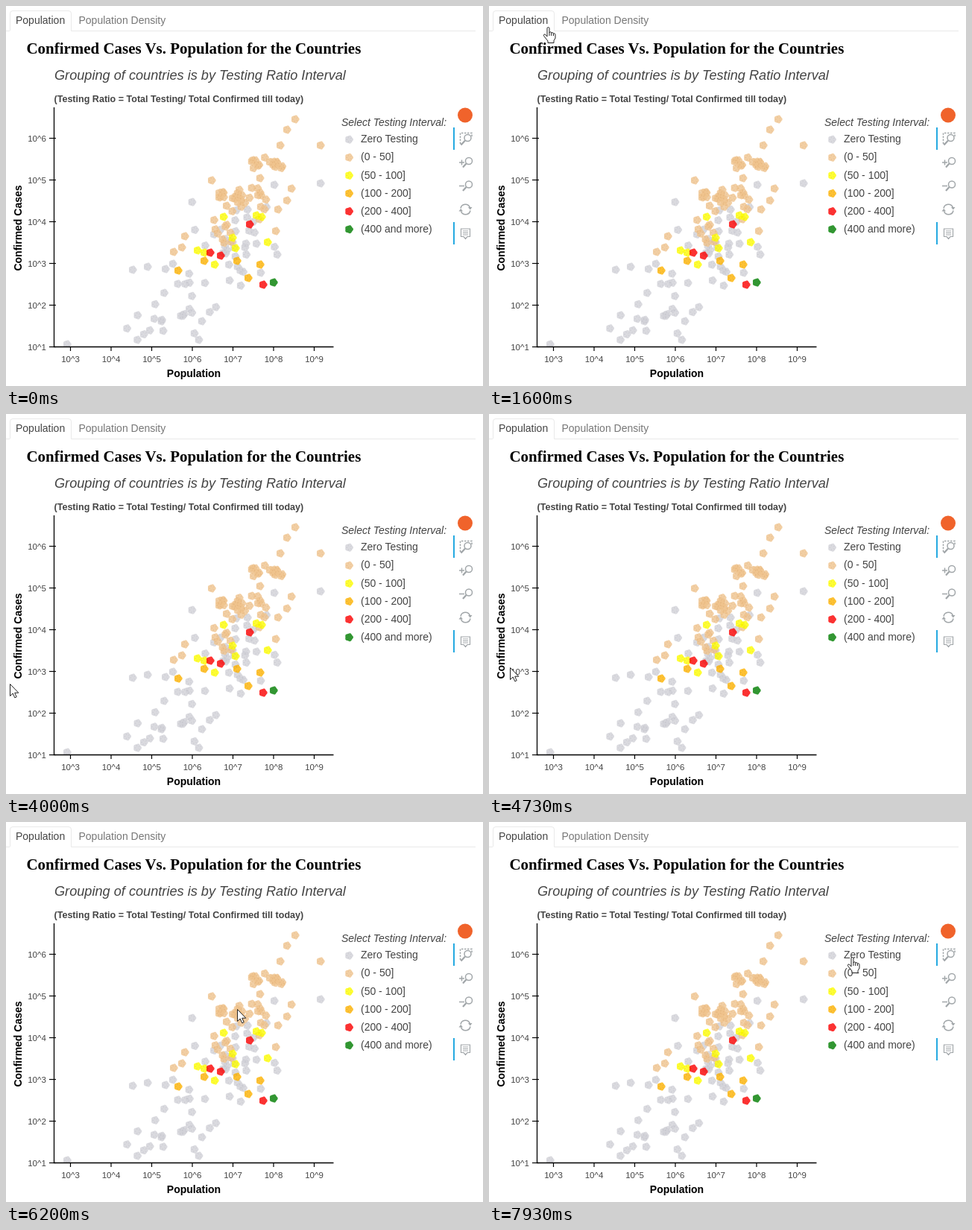
Write an HTML page that moves like this. It is 640 px wide and 510 px high and loops after 8000 ms.

```html
<!DOCTYPE html>
<html lang="en">
<head>
<meta charset="utf-8">
<title>Confirmed cases and population</title>
<style>
  html, body { margin: 0; width: 100%; height: 100%; overflow: hidden; background: #fff; }
  svg { display: block; width: 640px; height: 510px; }
  text { font: 14px "Liberation Sans", Arial, sans-serif; fill: #444; }
  .heading { font: bold 20.95px "Liberation Serif", Times, serif; fill: #000; }
  .subtitle { font-size: 18.16px; font-style: italic; }
  .legend-title { font-style: italic; }
  .note { font-size: 12.55px; font-weight: bold; }
  .axis-name { font-weight: bold; fill: #000; text-anchor: middle; }
  .tick { font-size: 11.5px; }
  .icon { fill: none; stroke: #a1a6a9; stroke-width: 1.5; }
  .cursor { fill: #fff; stroke: #222; stroke-linejoin: round; }
</style>
</head>
<body>
<svg viewBox="0 0 640 510">
  <defs>
    <clipPath id="plot"><rect x="65" y="136" width="375" height="322"/></clipPath>
  </defs>

  <path d="M5.5 33V10Q5.5 6.500 9 6.500H84Q87.500 6.500 87.500 10V33.500H630M5 33.500H0" fill="none" stroke="#e9e9e9"/>
  <text x="13" y="24">Population</text>
  <text x="97.500" y="24" style="fill:#777">Population Density</text>
  <text class="heading" x="27.500" y="64">Confirmed Cases Vs. Population for the Countries</text>
  <text class="subtitle" x="65" y="99">Grouping of countries is by Testing Ratio Interval</text>
  <text class="note" x="64.500" y="129">(Testing Ratio = Total Testing/ Total Confirmed till today)</text>

  <g id="dots" clip-path="url(#plot)"></g>
  <g id="axes"><path d="M64.500 136V457.500H439.500" fill="none" stroke="#000" stroke-width="1.300"/></g>
  <text class="axis-name" x="252" y="498">Population</text>
  <text class="axis-name" transform="translate(21 298) rotate(-90)">Confirmed Cases</text>

  <g id="legend"><text class="legend-title" x="450" y="161">Select Testing Interval:</text></g>

  <circle cx="616" cy="146.500" r="10" fill="#f0632b"/>
  <path d="M601 163V193M601 290V320" stroke="#26aae1" stroke-width="2"/>
  <g class="icon">
    <path d="M609.500 185V170.500H625V175M609.500 185H613" stroke-dasharray="2.500 1.500"/>
    <circle cx="619.500" cy="177" r="4.500"/><path d="M616 180.500L610.500 186.500" stroke-width="2.200"/>
    <circle cx="621" cy="208" r="4.500"/><path d="M617.500 211.500L613 216.500" stroke-width="2.200"/>
    <path d="M608 210H615M611.500 206.500V213.500"/>
    <circle cx="621" cy="239.500" r="4.500"/><path d="M617.500 243L613 248" stroke-width="2.200"/>
    <path d="M608 241.500H615"/>
    <path d="M610 271.500A6.500 6.500 0 0 1 622.500 270.500M623 274.500A6.500 6.500 0 0 1 610.500 275.500"/>
    <path d="M620 270H625.500L622.800 273.500ZM607.500 275.500H613L610.200 272Z" fill="#a1a6a9" stroke="none"/>
    <path d="M610.500 299H622.500V309.500H619L616.500 312.500L614 309.500H610.500ZM613 302H620M613 304.500H620M613 307H620" stroke-width="1.200"/>
  </g>

  <g class="cursor" id="cursor">
    <path id="arrow" d="M.5 .5V16.500L4.200 13L6.800 18.800L9.200 17.700L6.700 12.200H11.800Z"/>
    <g id="hand" transform="translate(-1.500 0)">
      <path d="M5.500 13V2.200Q5.500 .500 7 .500T8.500 2.200V8Q8.700 6.700 10 6.800T11.300 8.500Q11.700 7.300 12.800 7.600T14 9.300Q14.500 8.500 15.500 8.900T16.500 10.500V15L14.500 18.500V21.500H6.500V19L1.300 12.500Q.3 11.200 1.300 10.300T3.500 10.600Z"/>
      <path d="M8.500 8V12M11.300 8.500V12M14 9.300V12" fill="none"/>
    </g>
  </g>
</svg>

<script>
const LOOP = 8000, FRAME = 1000 / 15;
const $ = id => document.getElementById(id);

function add(parent, tag, attrs, text = "") {
  const node = document.createElementNS("http://www.w3.org/2000/svg", tag);
  for (const name in attrs) node.setAttribute(name, attrs[name]);
  node.textContent = text;
  parent.append(node);
  return node;
}

let seed = 7;
function random() {
  seed = (seed * 16807) % 2147483647;
  return seed / 2147483647;
}
// Bell-shaped, within -3..3
const spread = () => (random() + random() + random() - 1.5) * 2;

// Points scattered around a centre; slope tilts the cloud
function cloud({ count, x, y, sx, sy, slope = 0 }) {
  return Array.from({ length: count }, () => {
    const dx = spread() * sx;
    return [x + dx, Math.min(y + slope * dx + spread() * sy, 448)];
  });
}

// Five rounded petals around a centre
const petals = Array.from({ length: 60 }, (_, i) => {
  const a = i * Math.PI / 30, r = 5.3 + 0.4 * Math.cos(5 * a);
  return `${(r * Math.sin(a)).toFixed(2)} ${(-r * Math.cos(a)).toFixed(2)}`;
}).join("L");
const veins = [0, 1, 2, 3, 4].map(k => {
  const a = (k + 0.5) * Math.PI * 0.4, x = Math.sin(a), y = -Math.cos(a);
  return `M${x * 1.8} ${y * 1.8}L${x * 4.4} ${y * 4.4}`;
}).join("");

function flower(parent, x, y, fill, edge) {
  const g = add(parent, "g", { transform: `translate(${x} ${y}) rotate(18)`, opacity: 0.8 });
  add(g, "path", { d: `M${petals}Z`, fill });
  add(g, "path", { d: veins, stroke: edge, "stroke-width": 0.7 });
}

const groups = [
  { label: "Zero Testing", fill: "#d2d2d8", edge: "#bebec6",
    clouds: [
      { count: 36, x: 307, y: 318, sx: 23, sy: 30, slope: -0.4 },
      { count: 28, x: 225, y: 402, sx: 32, sy: 24, slope: -0.35 }],
    points: [[82, 454], [170, 354], [190, 350], [214, 353], [422, 238], [360, 240]] },
  { label: "(0 - 50]", fill: "#f0c48e", edge: "#e0ae75",
    clouds: [
      { count: 16, x: 349, y: 212, sx: 12, sy: 3.5 },
      { count: 22, x: 304, y: 258, sx: 11, sy: 9 },
      { count: 10, x: 341, y: 254, sx: 5, sy: 16 },
      { count: 9, x: 292, y: 309, sx: 7, sy: 13 }],
    points: [[388, 152], [377, 166], [368, 187], [422, 187], [276, 234], [383, 245],
      [377, 261], [365, 273], [362, 302], [240, 309], [236, 324], [225, 330]] },
  { label: "(50 - 100]", fill: "#ffff00", edge: "#e2dc00",
    points: [[292, 283], [336, 281], [343, 283], [351, 317], [304, 311], [308, 325],
      [257, 328], [266, 331], [280, 347]] },
  { label: "(100 - 200]", fill: "#ffb400", edge: "#dc9600",
    points: [[231, 355], [266, 342], [310, 342], [341, 347], [325, 365]] },
  { label: "(200 - 400]", fill: "#ff0000", edge: "#d80000",
    points: [[327, 293], [274, 331], [288, 335], [345, 374]] },
  { label: "(400 and more)", fill: "#008000", edge: "#006400", points: [[359, 371]] }
];

groups.forEach(({ label, fill, edge, clouds = [], points }, row) => {
  for (const [x, y] of [...points, ...clouds.flatMap(cloud)]) flower($("dots"), x, y, fill, edge);
  const y = 178.7 + row * 24.1;
  flower($("legend"), 460.3, y + 0.5, fill, edge);
  add($("legend"), "text", { x: 476, y: y + 4.6 }, label);
});

function tick(d, x, y, anchor, power) {
  add($("axes"), "path", { d, stroke: "#000", "stroke-width": 1.2 });
  add($("axes"), "text", { class: "tick", x, y, "text-anchor": anchor }, `10^${power}`);
}
for (let i = 0; i < 7; i++) {
  const x = 86.5 + i * 54.5;
  tick(`M${x} 457V463`, x, 477.5, "middle", i + 3);
}
for (let i = 0; i < 6; i++) {
  const y = 457.5 - i * 56;
  tick(`M58 ${y}H67`, 53.8, y + 4, "end", i + 1);
}

// Pointer moves; it rests between them
const moves = [
  { from: 270, to: 530, x: 444, y: 14 },
  { from: 670, to: 1330, x: 16, y: 27 },
  { from: 1400, to: 1600, x: 74, y: 28 },
  { from: 1870, to: 2730, x: 206, y: 482 },
  { from: 2750, to: 3400, x: 270, y: 491 },
  { from: 3530, to: 4000, x: 5, y: 362 },
  { from: 4000, to: 5000, x: 36, y: 332 },
  { from: 5270, to: 5600, x: 146, y: 62 },
  { from: 5600, to: 6000, x: 290, y: 258 },
  { from: 6130, to: 7060, x: 557, y: 164 },
  { from: 7060, to: 7330, x: 586, y: 172 },
  { from: 7330, to: 7920, x: 482, y: 181 }
];

function pointerAt(t) {
  let x = 590, y = -22;
  for (const move of moves) {
    const k = Math.min(Math.max((t - move.from) / (move.to - move.from), 0), 1);
    x += (move.x - x) * k;
    y += (move.y - y) * k;
  }
  return [Math.round(x), Math.round(y)];
}

const show = (id, on) => $(id).setAttribute("display", on ? "inline" : "none");

function draw(now) {
  const t = Math.floor((now % LOOP + 4) / FRAME) * FRAME;
  const [x, y] = pointerAt(t);
  const overTab = x < 215 && y < 34;
  const overLegend = x > 445 && y > 140;
  $("cursor").setAttribute("transform", `translate(${x} ${y})`);
  show("hand", overTab || overLegend);
  show("arrow", !overTab && !overLegend);
}

const start = performance.now();
function loop() {
  draw(performance.now() - start);
  requestAnimationFrame(loop);
}
loop();
</script>
</body>
</html>
```
